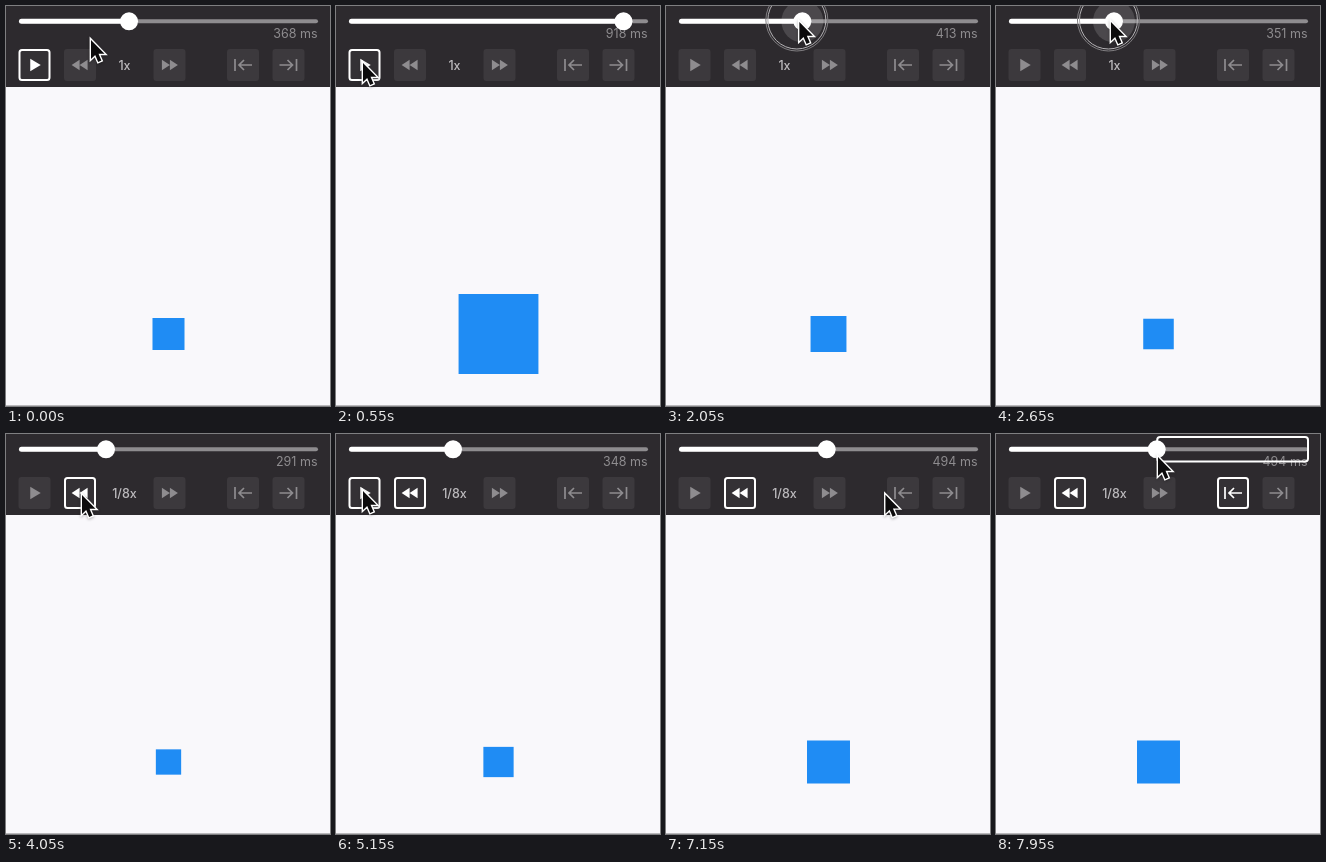
These frames come from a looping animation (324x400 px, 8 s). An HTML page with a canvas:

```html
<!DOCTYPE html>
<html lang="en">
<head>
<meta charset="utf-8">
<title>Timeline scrubber</title>
<style>
  html, body { margin: 0; width: 100%; height: 100%; overflow: hidden; background: #f9f8fb; }
  canvas { display: block; width: 324px; height: 400px; }
</style>
</head>
<body>
<canvas id="stage"></canvas>
<script>
const LOOP = 8000, STEP = 50;
const WHITE = '#fff', GRAY = '#8e8c8f';
const TRACK = { x: 13, y: 15.3, width: 299 };
const BUTTONS = { play: 12.5, slower: 58, faster: 147.5, start: 221, end: 266.5 };

// Moments of the user's actions
const PAUSE = 720, GRAB = 1700, PEAK = 2250, TROUGH = 2988, REST = 3350, DROP = 3450;
const SLOW = 3930, RESUME = 4694, STOP = 6318, RANGE = 7450;
const CLICKS = [PAUSE, SLOW, RESUME, RANGE];

// Pointer tip at each place it visits
const SPOT = {
  idle: [85, 34], play: [27, 57], grab: [51, 17], drop: [97, 16],
  slower: [76, 61], start: [239, 61], range: [162, 23]
};
const TRIPS = [
  [50, 550, 'idle', 'play'],
  [1000, 1350, 'play', 'grab'],
  [DROP, 3800, 'drop', 'slower'],
  [4100, 4500, 'slower', 'play'],
  [6500, 7300, 'play', 'start'],
  [7500, 7900, 'start', 'range']
];

const canvas = document.getElementById('stage');
const ctx = canvas.getContext('2d');
const ratio = window.devicePixelRatio || 1;
canvas.width = 324 * ratio;
canvas.height = 400 * ratio;
ctx.scale(ratio, ratio);

const within = (t, from, to) => t >= from && t < to;
const mix = (a, b, u) => a + (b - a) * u;

function ease(t, from, to) {
  const u = Math.min(1, Math.max(0, (t - from) / (to - from)));
  return u * u * (3 - 2 * u);
}

function timelineAt(t) {
  if (t < GRAB) return (368 + Math.min(t, PAUSE)) % 1000;
  if (t >= RESUME) return 291 + (Math.min(t, STOP) - RESUME) / 8;
  const out = mix(88, 552, ease(t, GRAB, PEAK));
  const back = mix(out, 195, ease(t, PEAK, TROUGH));
  return mix(back, 291, ease(t, TROUGH, REST));
}

function pointerAt(t, knob) {
  if (within(t, GRAB, DROP)) return [Math.max(SPOT.grab[0], knob - 3), 16];
  const [from, to, a, b] = TRIPS.filter(trip => trip[0] <= t).pop() || TRIPS[0];
  const u = ease(t, from, to);
  return SPOT[a].map((value, i) => mix(value, SPOT[b][i], u));
}

function shape(path, fill, stroke, width) {
  if (fill) {
    ctx.fillStyle = fill;
    ctx.fill(path);
  }
  if (stroke) {
    ctx.strokeStyle = stroke;
    ctx.lineWidth = width;
    ctx.stroke(path);
  }
}

function box(x, y, w, h, r, ...paint) {
  const path = new Path2D();
  path.roundRect(x, y, w, h, r);
  shape(path, ...paint);
}

function circle(x, y, r, ...paint) {
  const path = new Path2D();
  path.arc(x, y, r, 0, Math.PI * 2);
  shape(path, ...paint);
}

function label(text, x, y, align, weight, color) {
  ctx.font = weight + ' 12.5px Inter, sans-serif';
  ctx.textAlign = align;
  ctx.fillStyle = color;
  ctx.fillText(text, x, y);
}

// Icons are centred on 0,0; dir is 1 for right and -1 for left
const triangle = (dir, x, w, h) => `M${dir * (x - w / 2)} ${-h}L${dir * (x + w / 2)} 0L${dir * (x - w / 2)} ${h}Z`;
const skip = dir => new Path2D(triangle(dir, -3.6, 8, 5.2) + triangle(dir, 4.4, 8, 5.2));
const toEdge = dir => new Path2D(`M${8 * dir}-6V6M${-9 * dir} 0H${4 * dir}M${-dir}-5L${4 * dir} 0L${-dir} 5`);
const ICONS = {
  play: new Path2D(triangle(1, 1, 10.5, 6.2)),
  slower: skip(-1), faster: skip(1), start: toEdge(-1), end: toEdge(1)
};
const ARROW = new Path2D('M0 0V19L4.2 15L7.2 22L10.4 20.6L7.5 13.8H13.5Z');

function button(name, active) {
  const x = BUTTONS[name], color = active ? WHITE : GRAY;
  const outlined = name === 'start' || name === 'end';
  box(x, 43, 32, 32, 3, active ? '#343135' : '#3c393d');
  if (active) box(x + 1, 44, 30, 30, 2.5, null, WHITE, 2);
  ctx.save();
  ctx.translate(x + 16, 59);
  shape(ICONS[name], outlined ? null : color, outlined ? color : null, 1.7);
  ctx.restore();
}

function pointer(x, y) {
  ctx.save();
  ctx.translate(x, y);
  ctx.shadowColor = 'rgba(0,0,0,.3)';
  ctx.shadowBlur = 3 * ratio;
  ctx.shadowOffsetY = ratio;
  shape(ARROW, null, WHITE, 2.8);
  ctx.shadowColor = 'transparent';
  shape(ARROW, '#0c0b0c');
  ctx.restore();
}

function draw(t) {
  const value = timelineAt(t);
  const knob = TRACK.x + TRACK.width * value / 1000;
  const [px, py] = pointerAt(t, knob);
  const dragging = within(t, GRAB, DROP);
  const pressed = dragging || CLICKS.some(click => within(t, click - 120, click));
  const active = { play: t < PAUSE || within(t, RESUME, STOP), slower: t >= SLOW, start: t >= RANGE };

  box(0, 0, 324, 400, 0, '#f9f8fb');
  box(0, 399, 324, 1, 0, '#b9b8bb');
  box(0, 0, 324, 81, 0, '#2d2a2e');

  const size = value * .087;
  box(162.5 - size / 2, 328 - size / 2, size, size, 0, '#1f8cf4');

  label(Math.round(value) + ' ms', 311.5, 32.3, 'right', 400, GRAY);
  label(active.slower ? '1/8x' : '1x', 118.5, 63.5, 'center', 500, '#bdbbbe');
  for (const name in BUTTONS) button(name, active[name]);

  box(TRACK.x, TRACK.y - 2, TRACK.width, 4, 2, GRAY);
  box(TRACK.x, TRACK.y - 2.5, knob - TRACK.x, 5, 2.5, WHITE);
  if (active.start) box(knob + .5, 3, 311.5 - knob, 24.5, 3, null, WHITE, 2);
  if (dragging) circle(knob, TRACK.y, 21, 'rgba(255,255,255,.14)');
  circle(knob, TRACK.y, 9, WHITE);

  if (pressed) {
    circle(px - 2.5, py - 2, 31, null, '#7f7d80', 1);
    circle(px - 2.5, py - 2, 29, null, '#b4b2b5', 1);
  }
  pointer(px, py);
}

function frame() {
  const t = performance.now() % LOOP;
  draw(Math.floor(t / STEP) * STEP);
  requestAnimationFrame(frame);
}
frame();
</script>
</body>
</html>
```
